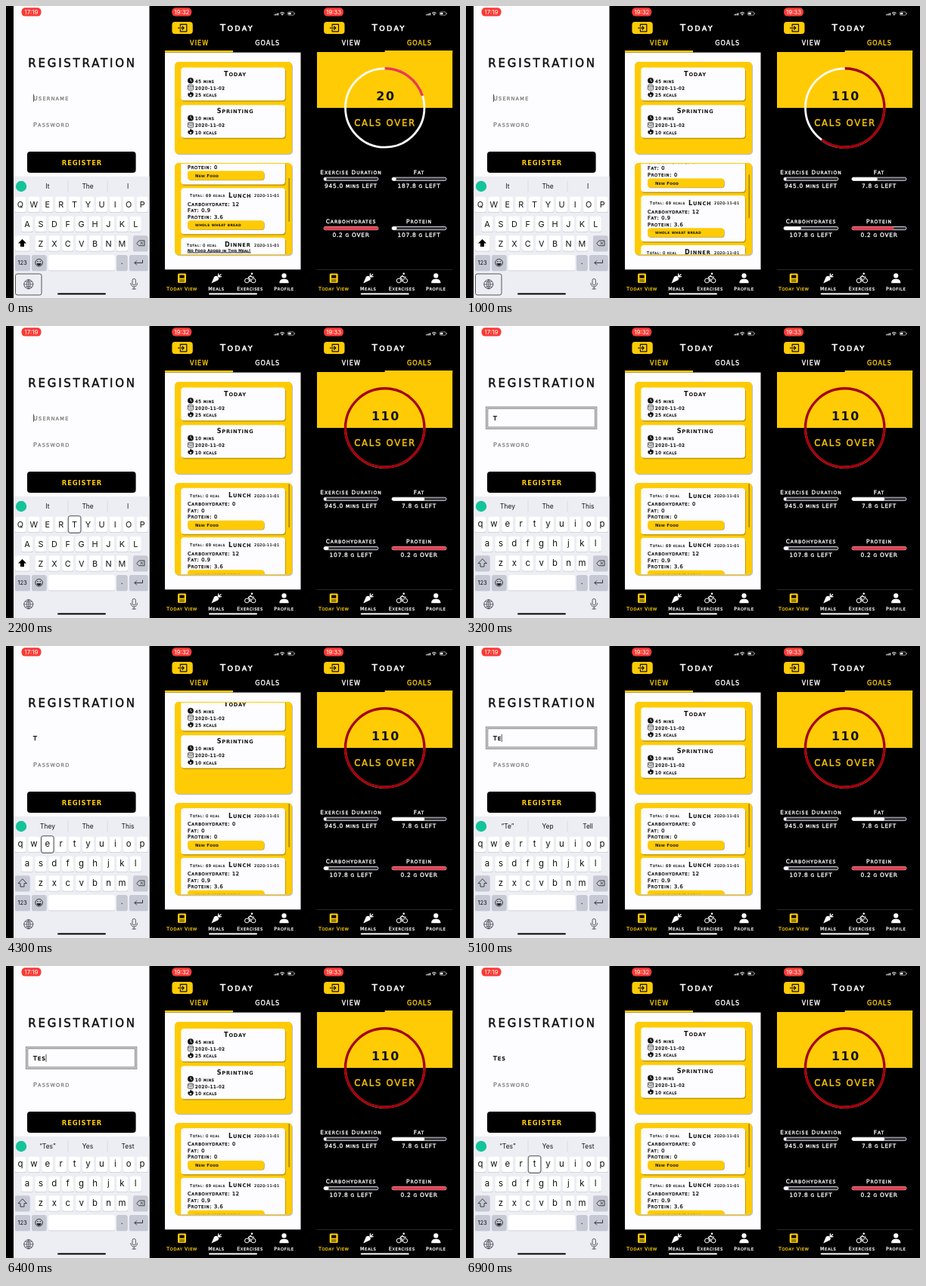
An HTML page that plays this animation: 600x387 px, repeating every 7000 ms.

```html
<!DOCTYPE html>
<html lang="en">
<head>
<meta charset="utf-8">
<title>Fitness app screens</title>
<style>
  html, body { margin: 0; width: 100%; height: 100%; overflow: hidden; background: #000; }
  svg { display: block; width: 600px; height: 387px; }
  text { font-family: "DejaVu Sans", sans-serif; stroke-linejoin: round; }
  .ui { font-family: Inter, "Liberation Sans", sans-serif; }
</style>
</head>
<body>
<svg id="stage" viewBox="0 0 600 387" xmlns="http://www.w3.org/2000/svg"></svg>
<script>
const LOOP = 7000, STEP = 100;
const GOLD = '#ffcb05', RED = '#e83b4e', DARK_RED = '#a4000a', PAPER = '#fdfcfe', INK = '#111';
const WIDTH = 179.5;

// ---- drawing helpers ----
const rect = (x, y, w, h, fill, r = 0, more = '') =>
  `<rect x="${x}" y="${y}" width="${w}" height="${h}" rx="${r}" fill="${fill}" ${more}/>`;
const circle = (x, y, r, fill, more = '') =>
  `<circle cx="${x}" cy="${y}" r="${r}" fill="${fill}" ${more}/>`;
const fillPath = (d, fill) => `<path d="${d}" fill="${fill}"/>`;
const line = (d, color, w = 1) =>
  `<path d="${d}" fill="none" stroke="${color}" stroke-width="${w}" stroke-linecap="round" stroke-linejoin="round"/>`;
const move = (x, y, body) => `<g transform="translate(${x} ${y})">${body}</g>`;

// Lowercase letters become small capitals.
const smallCaps = str => str.replace(/[a-z]+/g,
  run => `<tspan font-size=".82em">${run.toUpperCase()}</tspan>`);

// Low, widely set capitals.
function label(x, y, str, size, { fill = INK, at = 'start', gap = .105, bold = .3, weight = 400, more = '' } = {}) {
  return `<text x="${x}" y="${y}" font-size="${size}" font-weight="${weight}" fill="${fill}" stroke="${fill}"
    stroke-width="${bold}" text-anchor="${at}" letter-spacing="${(gap * size).toFixed(2)}" ${more}>${smallCaps(str)}</text>`;
}
const mid = (x, y, str, size, opts = {}) => label(x, y, str, size, { at: 'middle', ...opts });
const heavy = { weight: 700, gap: .095, bold: 0 };
const plain = (x, y, str, size, fill = INK, more = '') =>
  `<text class="ui" x="${x}" y="${y}" font-size="${size}" fill="${fill}" text-anchor="middle" ${more}>${str}</text>`;

const pill = (x, time) =>
  rect(x - 13, 2.2, 26, 11.4, '#fb3a35', 5) + plain(x, 10.7, time, 7.9, '#fff');
const homeBar = (x, fill) => rect(x - 32, 380.4, 64, 2.2, fill, 1.1);

// ---- registration screen ----
const ROWS = [['QWERTYUIOP', 19, 263], ['ASDFGHJKL', 28, 289], ['ZXCVBNM', 46, 314.5]];
const PITCH = 17.9;
const keySpots = {};
for (const [row, x, y] of ROWS) [...row].forEach((k, i) => keySpots[k] = [x + i * PITCH, y]);

const keyCap = (x, y, w, fill = '#fff') =>
  rect(x, y + .8, w, 20.5, '#c6c8cf', 2.6) + rect(x, y, w, 20.5, fill, 2.6);
const keyLetters = upper => Object.entries(keySpots).map(([k, [x, y]]) =>
  plain(x, y + (upper ? 4 : 3.4), upper ? k : k.toLowerCase(), upper ? 10.8 : 11.4)).join('');

const SHIFT = 'M21.5 309l-5.5 5.6h3v4.4h5v-4.4h3z';

function keyboard() {
  const gray = '#c5c9d4';
  return rect(10, 226, WIDTH, 161, '#eceef4')
    + circle(20, 239, 7.2, '#15c39a')
    + line('M82 232V246M134 232V246', '#d3d5db', .8)
    + [55, 108, 161].map((x, i) => plain(x, 242.2, '', 8.4, INK, `id="hint${i}"`)).join('')
    + Object.values(keySpots).map(([x, y]) => keyCap(x - 7.6, y - 10.3, 15.2)).join('')
    + keyCap(168, 304.2, 19.5, gray)
    + line('M173 314.3l3-3.4h7v6.8h-7zM178 312.9l2.8 2.8M180.8 312.9l-2.8 2.8', '#333', .9)
    + keyCap(12, 330, 20, gray) + plain(21.6, 343.2, '123', 7.6)
    + keyCap(34, 330, 19.5, gray)
    + circle(43.6, 340.2, 4.8, 'none', 'stroke="#222" stroke-width=".9"')
    + circle(41.9, 338.8, .8, '#222') + circle(45.3, 338.8, .8, '#222')
    + fillPath('M40.6 341h6a3 3 0 0 1-6 0z', '#222')
    + keyCap(56, 330, 88) + keyCap(146, 330, 14.5, gray) + plain(153.2, 342, '.', 10)
    + keyCap(163, 330, 24.5, gray)
    + line('M180.5 337v3.4h-10.5M172.6 337.8l-2.6 2.6 2.6 2.6', '#333')
    + `<g id="upper">${keyCap(12, 304.2, 19.5) + fillPath(SHIFT, '#000') + keyLetters(true)}</g>`
    + `<g id="lower">${keyCap(12, 304.2, 19.5, gray) + line(SHIFT, '#333', .9) + keyLetters(false)}</g>`
    + circle(29.8, 368.8, 6, 'none', 'stroke="#50545c"')
    + line('M23.8 368.8h12M29.8 362.8v12M29.8 362.8q-5.4 6 0 12M29.8 362.8q5.4 6 0 12M25.6 365.2q4.2 2 8.4 0M25.6 372.4q4.2-2 8.4 0', '#50545c', .8)
    + rect(167, 361.5, 4.4, 8.4, 'none', 2.2, 'stroke="#50545c"')
    + line('M164.8 367.5a4.4 4.6 0 0 0 8.8 0M169.2 372.3v2.6M167 375h4.4', '#50545c')
    + homeBar(100, '#000');
}

function registerScreen() {
  const box = (color, w) => rect(27.6, 108.4, 144, 26.8, 'none', 0, `stroke="${color}" stroke-width="${w}"`);
  return rect(10, 0, WIDTH, 387, PAPER)
    + pill(33.5, '17:19')
    + mid(101, 81, 'REGISTRATION', 15, { gap: .185, bold: .5 })
    + label(36, 125, 'Username', 7.9, { fill: '#777', gap: .16, bold: .25, more: 'id="hintUser"' })
    + label(36, 125, '', 7.9, { gap: .16, bold: .5, more: 'id="typed"' })
    + label(36, 159.5, 'Password', 7.9, { fill: '#777', gap: .16, bold: .25 })
    + rect(0, 117, 1, 10, '#555', 0, 'id="caret"')
    + `<g id="field">${box('#8c8c90', 3.4) + box('#c2c2c7', 1.8)}</g>`
    + rect(28, 193, 143.6, 28, '#000', 4)
    + mid(100.5, 210.5, 'REGISTER', 8.4, { ...heavy, fill: GOLD, gap: .11 })
    + keyboard()
    + `<rect id="focus" rx="2.5" fill="none" stroke="#444" stroke-width=".9"/>`;
}

// ---- parts shared by both tracker screens ----
const NAV = [
  [232.5, 'Today View', c => rect(227, 354.5, 11, 12.5, c, 1.6) + rect(229.4, 356.6, 6.2, 4, '#000') + line('M229.6 363h5.8M229.6 365h5.8', '#000', .8)],
  [278, 'Meals', c => fillPath('M271.5 367.5l3.6-8.6q3-2.4 5 .2 2.2 2.4-.2 4.4z', c) + line('M280.4 358.4l.4-3.6M280.8 358.4l3.2-2.6M281.4 359l3-.4', c, 1.3)],
  [322.5, 'Exercises', c => circle(318.4, 364, 2.9, 'none', `stroke="${c}"`) + circle(327, 364, 2.9, 'none', `stroke="${c}"`) + circle(325, 354.8, 1.3, c) + line('M322.6 365v-3l-2.4-2 3-2.6 2 2h2.4', c, 1.3)],
  [367.5, 'Profile', c => circle(367.5, 357.4, 3.1, c) + fillPath('M361.3 367.2q0-5.4 6.2-5.4t6.2 5.4z', c)]
];

function frame(time, active) {
  const signal = [0, 1, 2, 3].map(i => rect(354.5 + i * 1.6, 11 - i * .6, 1, 1.4 + i * .6, '#fff')).join('');
  return pill(232.3, time) + signal
    + line('M362.6 9.2q2.5-2.2 5 0M363.8 10.7q1.3-1.1 2.6 0', '#fff', 1) + circle(365.1, 11.9, .7, '#fff')
    + rect(372.5, 7.8, 8.2, 4.4, 'none', 1.2, 'stroke="#bbb" stroke-width=".7"') + rect(373.4, 8.7, 3.2, 2.6, '#fff', .5) + rect(381.4, 9.2, .7, 1.6, '#bbb')
    + rect(219.4, 21, 27.4, 16, GOLD, 4)
    + line('M230.4 27v-2.6h8.4v9.4h-8.4v-2.6M227.6 29.1h7.4M232.9 26.8l2.3 2.3-2.3 2.3', '#111', 1.2)
    + mid(305.5, 33, 'Today', 11.6, { fill: '#fff', gap: .2, bold: .6 })
    + ['VIEW', 'GOALS'].map((name, i) => mid(255.7 + 90 * i, 52, name, 8, { fill: i === active ? GOLD : '#fff', gap: .14, bold: .35 })).join('')
    + rect(active ? 300 : 210, 59, active ? WIDTH - 90 : 90, 2.6, GOLD)
    + rect(210, 349, WIDTH, .8, '#333')
    + NAV.map(([x, name, icon], i) => {
        const c = i ? '#fff' : GOLD;
        return icon(c) + mid(x, 377, name, 6.3, { fill: c, gap: .1, bold: .25 });
      }).join('')
    + homeBar(300, '#fff');
}

// ---- day view ----
const whiteCard = h => rect(232.3, 1.5, 137.6, h, '#8d7206', 4, 'opacity=".55"') + rect(231.3, 0, 137.6, h, PAPER, 4);

const workout = (y, name, mins, kcals) => move(0, y, whiteCard(43.6)
  + mid(303, 11, name, 8.1, { ...heavy })
  + circle(244, 17.2, 3.9, '#111') + line('M244 15v2.4l1.6 1', '#fff', .8)
  + rect(240.6, 23.1, 6.8, 6.6, 'none', .8, 'stroke="#222" stroke-width=".8"') + line('M240.6 25.1h6.8M242.4 27.3h3.4', '#222', .7)
  + fillPath('M244.2 30.8q.4 2 2 2.8.6-.6.4-1.4 2.6 4.2-.4 6.4-2.4 1.2-4.6-.2-2.6-2.6 0-5.2 0 1 .8 1.2 1-1.4 1.8-3.6z', '#111')
  + circle(244, 36.8, 1.2, PAPER)
  + [`${mins} mins`, '2020-11-02', `${kcals} kcals`].map((s, i) => label(250, 20 + i * 9.2, s, 5.8, { gap: .1 })).join(''));

const mealHead = (total, x, name, tx) =>
  label(tx, 12, `Total: ${total}`, 5.1, { bold: .2 })
  + label(x, 12.6, name, 8.1, { ...heavy })
  + label(328, 12, '2020-11-01', 5, { gap: .09, bold: .2 });

const meal = (y, total, facts, food) => move(0, y, whiteCard(61)
  + mealHead(total, 294, 'Lunch', 243)
  + ['Carbohydrate', 'Fat', 'Protein'].map((n, i) => label(240, 23.4 + i * 8.5, `${n}: ${facts[i]}`, 6.6)).join('')
  + rect(240.8, 44, 101, 11.8, '#8d7206', 4, 'opacity=".6"') + rect(240, 43, 101, 12, GOLD, 4)
  + label(250, 51.2, food, 5.4, { ...heavy, gap: .05 }));

const goldBox = (y, h) => rect(224, y + 1.2, 155, h, '#8b8b92', 5, 'opacity=".55"') + rect(223, y, 155, h, GOLD, 5);

function viewScreen() {
  return rect(210, 61.6, WIDTH, 288, PAPER)
    + goldBox(74, 122)
    + `<g clip-path="url(#clipDays)"><g id="days">${workout(81.6, 'Today', 45, 25) + workout(131.2, 'Sprinting', 10, 10)}</g></g>`
    + goldBox(208, 122)
    + `<g clip-path="url(#clipMeals)"><g id="meals">`
    + meal(215, '0 kcal', [0, 0, 0], 'New Food')
    + meal(280.7, '69 kcals', [12, .9, 3.6], 'whole wheat bread')
    + move(0, 346.4, whiteCard(30) + mealHead('0 kcal', 289, 'Dinner', 239)
        + label(240, 18.8, 'No Food Added in This Meal!', 5.1, { gap: .08, more: 'text-decoration="underline"' }))
    + `</g></g>` + rect(373.4, 0, 1.6, 58, '#a98508', .8, 'id="bar"')
    + frame('19:32', 0);
}

// ---- goals view ----
const GOALS = [
  { name: 'Exercise Duration', x: 456, y: 223, from: .05, to: .05, was: '945.0 mins LEFT', now: '945.0 mins LEFT' },
  { name: 'Fat', x: 546, y: 223, from: .08, to: .6, was: '187.8 g LEFT', now: '7.8 g LEFT' },
  { name: 'Carbohydrates', x: 456, y: 288.3, from: 1, to: .09, was: '0.2 g OVER', now: '107.8 g LEFT' },
  { name: 'Protein', x: 546, y: 288.3, from: .09, to: 1, was: '107.8 g LEFT', now: '0.2 g OVER' }
];

function goalsScreen() {
  return rect(411, 61, WIDTH - .5, 74, GOLD)
    + circle(500.7, 135, 52.2, 'none', 'stroke="#fff" stroke-width="2.8"')
    + circle(500.7, 135, 52.2, 'none', 'id="ring" stroke-width="3.4" pathLength="100" transform="rotate(-90 500.7 135)"')
    + mid(502, 125, '', 15.8, { ...heavy, gap: .11, more: 'id="count"' })
    + mid(501, 159, 'CALS OVER', 11.7, { fill: GOLD, gap: .145, bold: .35 })
    + GOALS.map(({ name, x, y }, i) =>
        mid(x, y, name, 7.4, { fill: '#fff', gap: .13 })
        + rect(x - 36, y + 4.2, 72, 4.2, '#34343a', 2.1, 'stroke="#e4e4e8" stroke-width=".9"')
        + rect(x - 36, y + 4.2, 0, 4.2, '#fff', 2.1, `id="goal${i}"`)
        + mid(x, y + 18, '', 7.4, { fill: '#fff', gap: .1, more: `id="left${i}"` })).join('')
    + move(200.7, 0, frame('19:33', 1));
}

const stage = document.getElementById('stage');
stage.innerHTML = `<defs>
    <clipPath id="clipDays"><rect x="223" y="75" width="155" height="120.5"/></clipPath>
    <clipPath id="clipMeals"><rect x="223" y="209" width="155" height="120"/></clipPath>
  </defs>` + rect(0, 0, 600, 387, '#000') + registerScreen() + viewScreen() + goalsScreen();

// ---- motion ----
const el = {};
stage.querySelectorAll('[id]').forEach(n => el[n.id] = n);
const set = (node, attrs) => { for (const k in attrs) node.setAttribute(k, attrs[k]); };
const show = (node, on) => node.style.display = on ? '' : 'none';
const clamp = v => Math.min(1, Math.max(0, v));
const smooth = v => v * v * (3 - 2 * v);
const mix = (a, b, p) => a + (b - a) * p;

function track(t, points) {
  for (let i = 1; i < points.length; i++) {
    const [t0, a] = points[i - 1], [t1, b] = points[i];
    if (t < t1) return mix(a, b, smooth(clamp((t - t0) / (t1 - t0))));
  }
  return points[points.length - 1][1];
}

const TYPING = [
  { at: 0, text: '', caret: 36, hints: ['It', 'The', 'I'] },
  { at: 2700, text: 'T', caret: 42.5, hints: ['They', 'The', 'This'] },
  { at: 4800, text: 'Te', caret: 46.8, hints: ['“Te”', 'Yep', 'Tell'] },
  { at: 6200, text: 'Tes', caret: 52.5, hints: ['“Tes”', 'Yes', 'Test'] }
];
const FOCUS = [[0, 'globe'], [1600, 'T'], [2700, 'field'], [3700, 'E'], [4800, 'field'], [5300, 'S'], [6200, 'field'], [6600, 'T']];

const DAYS = [[3500, 0], [4300, -13], [4900, 0], [5200, 0], [5800, 13], [6000, 13], [6500, 0]];
const MEALS = [[0, -39.5], [1000, -29.5], [2100, -.5], [2400, 0]];
const SWITCH = 600, GROW = 800;

function drawTyping(t) {
  const now = TYPING.findLast(s => t >= s.at);
  const focus = FOCUS.findLast(f => t >= f[0])[1];
  el.typed.innerHTML = smallCaps(now.text);
  now.hints.forEach((h, i) => el['hint' + i].textContent = h);
  show(el.hintUser, !now.text);
  show(el.upper, !now.text);
  show(el.lower, now.text);
  show(el.caret, (t - now.at) % 1000 < 500);
  set(el.caret, { x: now.caret });

  show(el.field, focus === 'field');
  show(el.focus, focus !== 'field');
  if (focus === 'globe') set(el.focus, { x: 12.5, y: 355, width: 34.5, height: 28 });
  else if (focus !== 'field') {
    const [x, y] = keySpots[focus];
    set(el.focus, { x: x - 8.3, y: y - 11.3, width: 16.6, height: 22.6 });
  }
}

function drawScroll(t) {
  const y = track(t, MEALS);
  set(el.days, { transform: `translate(0 ${track(t, DAYS)})` });
  set(el.meals, { transform: `translate(0 ${y})` });
  set(el.bar, { y: 209 - y * .48 });
}

function drawGoals(t) {
  const over = t >= SWITCH, p = clamp((t - SWITCH) / GROW);
  el.count.textContent = over ? 110 : 20;
  set(el.ring, {
    stroke: over ? DARK_RED : RED,
    'stroke-dasharray': `${mix(20, 100, smooth(p))} 100`
  });
  const grown = 1 - (1 - p) ** 2;
  GOALS.forEach(({ from, to, was, now }, i) => {
    const text = over ? now : was;
    el['left' + i].innerHTML = smallCaps(text);
    set(el['goal' + i], { width: 72 * mix(from, to, grown), fill: text.endsWith('OVER') ? RED : '#fff' });
  });
}

const start = performance.now();
function tick() {
  const t = Math.floor((performance.now() - start) % LOOP / STEP) * STEP;
  drawTyping(t);
  drawScroll(t);
  drawGoals(t);
  requestAnimationFrame(tick);
}
tick();
</script>
</body>
</html>
```
